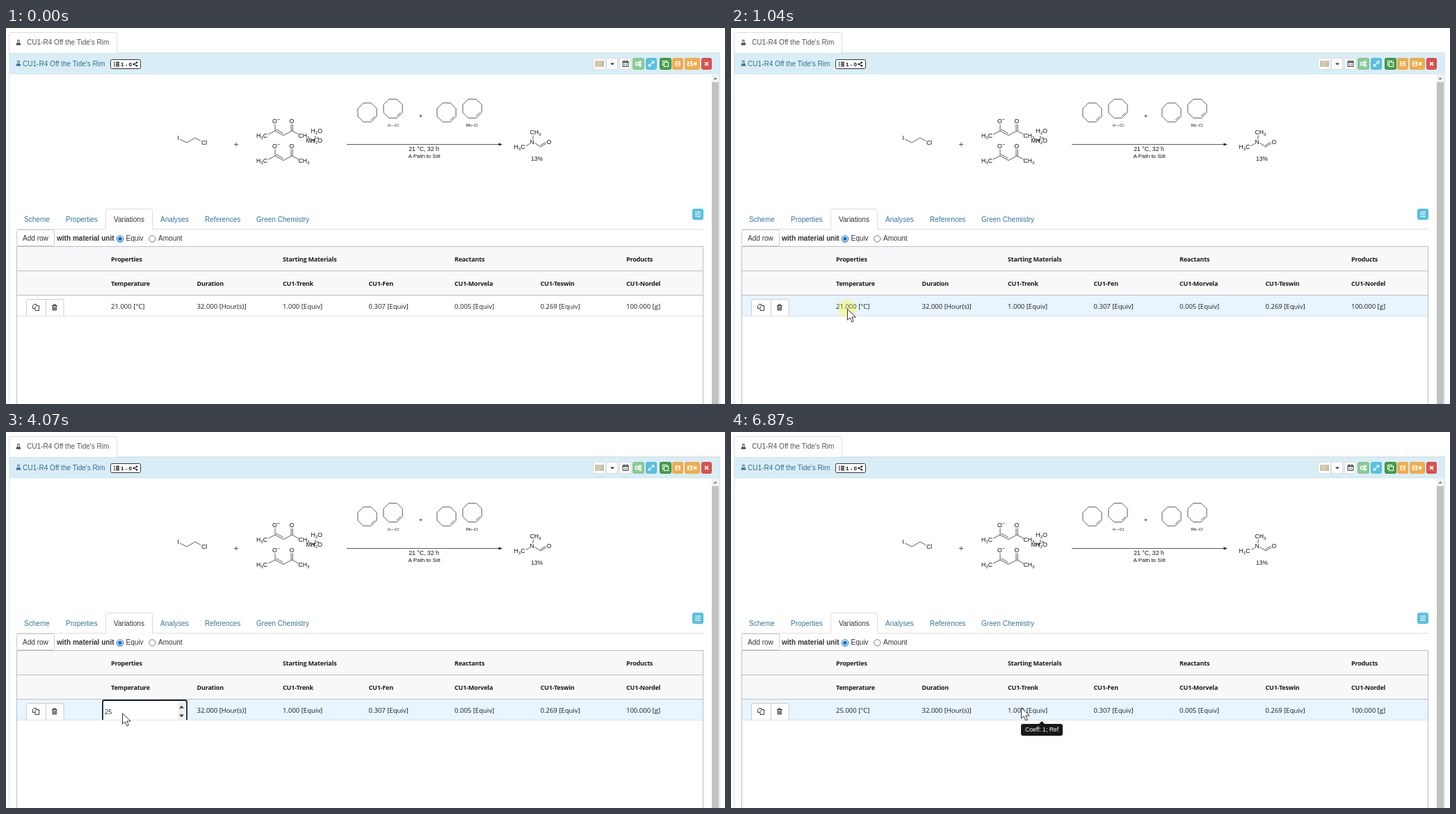
An HTML page for the animation above (8 s loop, 1034 by 541 pixels).

```html
<!DOCTYPE html>
<html lang="en">
<head>
<meta charset="utf-8">
<title>Reaction variations</title>
<style>
html, body { margin: 0; width: 100%; height: 100%; overflow: hidden; background: #fff; }
svg { display: block; }
text { font: 10.05px "Liberation Sans", Arial, sans-serif; fill: #333; white-space: pre; }
.b { font-weight: 700; }
.link { fill: #33759f; }
.cell { font: 9.5px "Open Sans", "Noto Sans", sans-serif; fill: #181d1f; }
.head { font: 700 9px "Open Sans", "Noto Sans", sans-serif; letter-spacing: -.2px; fill: #181d1f; }
.chem { font-size: 8.7px; fill: #111; }
.bond { fill: none; stroke: #333; stroke-width: .8; }
.mid { text-anchor: middle; }
</style>
</head>
<body>
<svg id="stage" width="1034" height="541" viewBox="0 0 1034 541"></svg>
<script>
const LOOP = 8000;
const stage = document.getElementById('stage');

const text = (x, y, s, cls = '', extra = '') => `<text x="${x}" y="${y}" class="${cls}" ${extra}>${s}</text>`;
const rect = (x, y, w, h, fill, extra = '') => `<rect x="${x}" y="${y}" width="${w}" height="${h}" fill="${fill}" ${extra}/>`;
const path = (d, extra = '') => `<path d="${d}" ${extra}/>`;
const bond = d => path(d, 'class="bond"');
const line = (d, color, width = 1) => path(d, `fill="none" stroke="${color}" stroke-width="${width}"`);
const group = (x, y, body, extra = '') => `<g transform="translate(${x} ${y})" ${extra}>${body}</g>`;

// Chemical label: digits become subscripts
const formula = (x, y, s) => text(x, y,
  s.replace(/\d/g, d => `<tspan font-size="6.2" dy="1.6">${d}</tspan><tspan dy="-1.6">&#8203;</tspan>`), 'chem');

function flask(x, y, color) {
  return group(x, y, line('M2.2 .4H5.6M2.9 .5V3L.7 7H7.1L4.9 3V.5', color, .9) +
    path('M2.1 4.5H5.7L7.1 7.2H.7Z', `fill="${color}"`));
}

function pageHeader() {
  let s = line('M160 35.5H1026', '#e4e4e4') + rect(4, 37, 1022, 29, '#d9edf7');
  s += line('M4.5 541V36.5H1026.5V541M4 66H1026', '#cbe8f1');
  s += path('M4.5 36V9Q4.5 6.5 7 6.5H157Q159.5 6.5 159.5 9V36', 'fill="#fff" stroke="#ddd"');
  s += flask(14, 17, '#444') + text(30, 24, "CU1-R4 Off the Tide's Rim", '', 'style="fill:#555"');
  s += flask(14, 47, '#31708f') + text(24, 55, "CU1-R4 Off the Tide's Rim", '', 'style="fill:#31708f"');
  s += rect(150.5, 45.5, 43, 13, '#fff', 'rx="2" stroke="#333"');
  s += line('M155 49.5h1.5M158 49.5h5M155 52h1.5M158 52h5M155 54.5h1.5M158 54.5h5', '#111', 1.4);
  s += text(165, 55, '1 - 0', 'b', 'style="font-size:8px;fill:#111"') + line('M188 49.5L184 52L188 54.5', '#111');
  s += [[188, 49.7], [183.8, 52], [188, 54.3]].map(([x, y]) => `<circle cx="${x}" cy="${y}" r="1.3" fill="#111"/>`).join('');
  return s;
}

const disk = x => rect(x, 48, 7, 7, '#fff', 'rx=".8"') + rect(x + 1.5, 49, 3.5, 2, '#f0ad4e') + rect(x + 1.3, 52.2, 4.4, 2, '#f0ad4e');
const cross = (x, r) => line(`M${x - r} ${51.5 - r}l${2 * r} ${2 * r}M${x + r} ${51.5 - r}l${-2 * r} ${2 * r}`, '#fff', 1.8);

function toolbar() {
  const buttons = [
    [844, 19, '#fff', '#ddd'], [863, 17, '#fff', '#ddd'], [882, 17, '#fff', '#ddd'],
    [901, 17, '#8cc995', '#84c48d'], [920, 16, '#5bc0de', '#50bcdb'], [940, 17, '#4a9f4d', '#398439'],
    [958, 16, '#f0ad4e', '#eea845'], [976, 22, '#f0ad4e', '#eea845'], [1000, 15, '#d9534f', '#d64a45']];
  let s = buttons.map(([x, w, fill, edge]) =>
    rect(x + .5, 43.5, w - 1, 16, fill, `rx="2" stroke="${edge}"`)).join('');
  s += rect(847, 47, 13, 9, 'url(#tint)') + path('M869 50.5h6l-3 3z', 'fill="#333"');
  s += rect(887, 48, 8, 7.5, 'none', 'stroke="#444"') + line('M887 49.5h8M889 46.5v2M893 46.5v2', '#444', 1.4) +
    line('M889.6 51v4M892.4 51v4M887 53h8', '#777', .6);
  s += [[907.5, 51.5, 2.2], [912, 49.3, 1.4], [912, 53.8, 1.4]].map(([x, y, r]) =>
    `<circle cx="${x}" cy="${y}" r="${r}" fill="none" stroke="#fff" stroke-width="1.4"/>`).join('');
  s += line('M924.5 55L931.5 48M928.5 48h3.2v3.2M924.3 51.8V55h3.2', '#fff', 1.2);
  s += rect(944.5, 47.5, 6, 6, 'none', 'stroke="#fff"') + rect(946.5, 49.5, 6, 6, '#4a9f4d', 'stroke="#fff"');
  return s + disk(962.5) + disk(980) + cross(991, 2) + cross(1007.5, 2.4);
}

function ring(cx, cy) {
  const pt = (i, r) => {
    const a = (i + .5) * Math.PI / 4;
    return `${(cx + r * Math.cos(a)).toFixed(2)} ${(cy + r * Math.sin(a)).toFixed(2)}`;
  };
  const corners = [...Array(8).keys()].map(i => pt(i, 14.7));
  return bond(`M${corners.join('L')}Z`) + bond(`M${pt(.1, 12.3)}L${pt(.9, 12.3)}`);
}

const chelate = y => group(0, y,
  text(383, 137, 'O', 'chem') + text(390, 133, '–', 'chem', 'style="font-size:7px"') + text(407.5, 137, 'O', 'chem') +
  formula(360, 158, 'H3C') + formula(420.5, 158, 'CH3') +
  bond('M377 153L387 148V138.5M387 148L399 154.5L411 148L421 153M388.5 145.8L398.5 151.5M410 148V138.5M412.3 148V138.5'));

function scheme() {
  let s = text(246.5, 161, 'I', 'chem') + bond('M250 160L260 165L272 158L280 162.5') + text(281, 168, 'Cl', 'chem');
  s += bond('M328 167.5H334M331 164.5V170.5M594.5 126.5H598.5M596.5 124.5V128.5');
  s += chelate(0) + chelate(36);
  s += formula(438.5, 151, 'H2O') + formula(438.5, 165, 'H2O') + text(431.5, 165, 'Mn', 'chem') +
    text(443, 161, '2+', 'chem', 'style="font-size:6.5px"');
  s += [[519.5, 121.5], [556.5, 116], [633.5, 121.5], [670.5, 116]].map(c => ring(...c)).join('');
  s += text(557, 142, 'Ir—Cl', 'chem mid', 'style="font-size:6.2px"') + text(670, 142, 'Rh–Cl', 'chem mid', 'style="font-size:6.2px"');
  s += bond('M490 167.5H710') + path('M708.5 165.5L714 167.5L708.5 169.5Z', 'fill="#222"');
  s += text(601, 177.3, '21 °C, 32 h', 'chem mid') + text(601.5, 187, 'A Path to Silt', 'chem mid', 'style="font-size:8px"');
  s += formula(753.5, 153, 'CH3') + text(753.5, 167, 'N', 'chem') + formula(730.5, 174, 'H3C') + text(777.5, 167, 'O', 'chem');
  s += bond('M758.5 154.5L757.5 160M748 169.5L753 166.5M760.5 165.5L769 171L777 166M768.5 169L776 164.3');
  return s + text(763.5, 191, '13%', 'chem mid', 'style="font-size:8.4px"');
}

function controls() {
  let s = line('M15 289.5H143.5V263Q143.5 260.5 146 260.5H208Q210.5 260.5 210.5 263V289.5H1003', '#ddd');
  [[26, 'Scheme'], [86, 'Properties'], [155, 'Variations'], [222, 'Analyses'], [286, 'References'], [360, 'Green Chemistry']]
    .forEach(([x, name]) => s += text(x, 278.5, name, name === 'Variations' ? '' : 'link'));
  s += rect(987.5, 260.5, 15, 15, '#5bc0de', 'rx="2" stroke="#50bcdb"');
  s += line('M991 265h8M991 268h8M991 271h8M996.5 264v2M993 267v2M996.5 270v2', '#fff', 1.1);
  s += rect(15.5, 290.5, 54, 23, '#fff', 'rx="2" stroke="#ccc"') + text(24, 305.5, 'Add row');
  s += text(73, 306.3, 'with material unit', 'b') + text(172.5, 306.3, 'Equiv') + text(219, 306.3, 'Amount');
  s += '<circle cx="164" cy="303.3" r="4.6" fill="#fff" stroke="#0a6fc8" stroke-width="1.1"/><circle cx="164" cy="303.3" r="2.8" fill="#0a6fc8"/>';
  return s + '<circle cx="210.3" cy="303.3" r="4.6" fill="#fff" stroke="#777"/>';
}

const column = i => 151 + i * 123.5;

function table() {
  let s = rect(15.5, 314.5, 987, 240, '#fff', 'stroke="#babfc7"') + rect(16, 315, 986, 69, '#f8f8f8');
  s += line('M16 349.5H1002M16 384.5H1002', '#babfc7') + rect(16, 385, 986, 29, '#e8f4fe', 'id="hover"');
  s += line('M16 414.5H1002', '#dde2eb');
  [[0, 'Properties'], [2, 'Starting Materials'], [4, 'Reactants'], [6, 'Products']]
    .forEach(([i, name]) => s += text(column(i), 336, name, 'head'));
  ['Temperature', 'Duration', 'CU1-Trenk', 'CU1-Fen', 'CU1-Morvela', 'CU1-Teswin', 'CU1-Nordel']
    .forEach((name, i) => s += text(column(i), 371, name, 'head'));
  ['21.000 [°C]', '32.000 [Hour(s)]', '1.000 [Equiv]', '0.307 [Equiv]', '0.005 [Equiv]', '0.269 [Equiv]', '100.000 [g]']
    .forEach((value, i) => s += text(column(i), 404, value, 'cell', i ? '' : 'id="temp"'));
  s += path('M29.5 414V392.5Q29.5 390.5 31.5 390.5H81Q83 390.5 83 392.5V414M57.5 390.5V414', 'fill="#fff" stroke="#ccc"');
  s += line('M41.5 403.5H38.5V399.5L40.5 397.5H43.5V399.5M42 401.5L44 399.5H47.5V406.5H42Z', '#222', .9);
  s += line('M66 399.5H73.5M68.3 399V397.8H71.2V399', '#222');
  return s + line('M67.2 400V406H72.3V400M68.9 401.2V405M70.6 401.2V405', '#222');
}

function scrollbar() {
  return rect(1015, 67, 11, 474, '#f1f1f1') + path('M1017.5 74h5l-2.5-3z', 'fill="#777"') + rect(1015, 78, 10, 463, '#c1c1c1');
}

function overlays() {
  const arrow = 'M.5 .7V16.2L4.1 12.9L6.8 19L9.4 17.9L6.8 12H12.3Z';
  const beam = 'M-4.5 -8.5H-1.5L0 -7.8L1.5 -8.5H4.5M0 -8V8M-4.5 8.5H-1.5L0 7.8L1.5 8.5H4.5';
  return rect(138.5, 385.5, 123, 28, 'none', 'id="focus" stroke="#2196f3"') +
    `<g id="editor">${path('M139 414V388.5Q139 386 141.5 386H257.5Q260 386 260 388.5V414', 'fill="#fff" stroke="#18222e" stroke-width="1.8"')}
      ${rect(247, 389, 11, 25, '#efefef')}${path('M249 397.5h7l-3.5-4zM249 406.5h7l-3.5 4z', 'fill="#444"')}
      ${text(141.7, 406, '21', 'cell', 'id="typed"')}${rect(152, 395, 1, 14, '#111', 'id="caret"')}</g>` +
    `<g id="tip">${rect(417, 420, 60, 17, '#000', 'rx="3"')}${path('M443 420h8l-4-4z')}
      ${text(447, 431.3, 'Coeff: 1; Ref', 'mid', 'style="font-size:8.6px;fill:#fff"')}</g>` +
    '<circle id="click" cx="167" cy="404" r="13" fill="#ffff00" fill-opacity=".3"/>' +
    group(169, 405, line(beam, '#fff', 2.6) + line(beam, '#000', 1.4), 'id="beam"') +
    group(0, 0, path(arrow, 'fill="#fff" stroke="#222" stroke-width=".9"'), 'id="arrow"');
}

stage.innerHTML = `<defs><linearGradient id="tint"><stop stop-color="#bccbb2"/><stop offset=".5" stop-color="#e0c8a8"/>
  <stop offset="1" stop-color="#a9c2af"/></linearGradient></defs>` +
  pageHeader() + toolbar() + scheme() + controls() + table() + scrollbar() + overlays();

// Pointer stops: time, x, y
const POINTER = [
  [200, 253, 407], [420, 182, 409], [610, 169, 405], [840, 167, 404.5], [1040, 167, 404],
  [5290, 184, 400], [5480, 243, 394.5], [5650, 288, 396], [5900, 303, 397.5], [6070, 322, 395.5],
  [6270, 350, 395], [6480, 388.5, 400.5], [6690, 413, 397.5], [6870, 417, 396]];

const part = Object.fromEntries(['hover', 'temp', 'focus', 'editor', 'typed', 'caret', 'tip', 'click', 'beam', 'arrow']
  .map(id => [id, document.getElementById(id)]));
const show = (id, on) => part[id].setAttribute('visibility', on ? 'inherit' : 'hidden');

function draw(t) {
  const within = (from, to) => t >= from && t < to;
  const editing = within(1410, 4270);
  const stop = POINTER.findLast(p => p[0] <= t);
  show('hover', t >= 420);
  show('click', within(1040, 1220));
  show('focus', within(1220, 1410) || within(4270, 4460));
  show('editor', editing);
  show('temp', !editing);
  // The caret inherits from its group, so it needs the editing test too
  show('caret', within(1410, 2010) || within(2410, 3660));
  show('beam', within(1410, 4070));
  show('arrow', stop && !within(1410, 4070));
  show('tip', t >= 6690);
  part.tip.setAttribute('opacity', t < 6870 ? .5 : .9);
  part.typed.textContent = t < 3010 ? '21' : '25';
  part.temp.textContent = t < 4270 ? '21.000 [°C]' : '25.000 [°C]';
  if (stop) part.arrow.setAttribute('transform', `translate(${stop[1]} ${stop[2]})`);
}

const start = performance.now();
function tick() {
  draw((performance.now() - start) % LOOP);
  requestAnimationFrame(tick);
}
draw(0);
requestAnimationFrame(tick);
</script>
</body>
</html>
```
